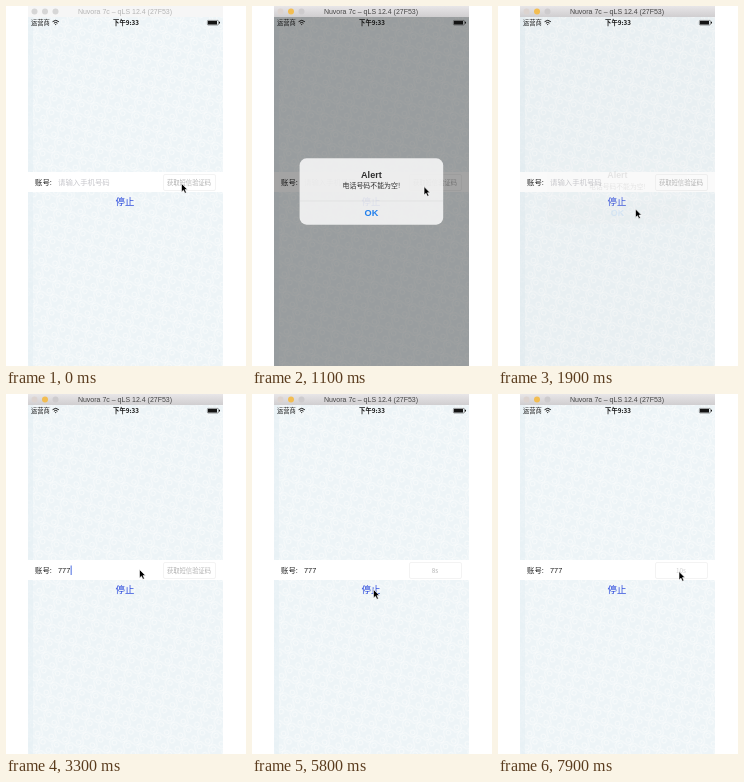
These frames come from a looping animation (240 px wide and 360 px high, 8 s). An HTML page:

```html
<!DOCTYPE html>
<html lang="zh-CN">
<head>
<meta charset="utf-8">
<title>验证码</title>
<style>
html, body { margin: 0; width: 100%; height: 100%; overflow: hidden; background: #fff; }
svg { display: block; width: 100vw; height: 100vh; }
text { font-family: "Noto Sans CJK SC", "Noto Sans CJK", "Noto Sans CJK JP", sans-serif; fill: #222; }
.latin { font-family: "Liberation Sans", Inter, sans-serif; }
.mid { text-anchor: middle; }
.status { font-size: 6.3px; fill: #141414; }
.field { font-size: 7.4px; }
.code { font-size: 6.3px; fill: #b2b2b2; }
</style>
</head>
<body>
<svg viewBox="0 0 240 360">
  <defs>
    <linearGradient id="bar" x2="0" y2="1">
      <stop stop-color="#e8e6e8"/><stop offset="1" stop-color="#d0ced0"/>
    </linearGradient>
    <pattern id="swirls" width="14" height="14" patternUnits="userSpaceOnUse" patternTransform="rotate(12)">
      <g fill="none" stroke="#fbfdfd" stroke-width=".8">
        <circle cx="3.5" cy="3.5" r="2.4"/>
        <circle cx="10.5" cy="10.5" r="2.4"/>
        <path d="M7 0Q10 3 7 7T7 14M0 7Q3 10 7 7T14 7"/>
      </g>
    </pattern>
    <clipPath id="phone"><rect x="22" y="11" width="195" height="349"/></clipPath>
  </defs>

  <rect x="22" width="195" height="11" fill="#f6f6f6"/>
  <rect id="activeBar" x="22" width="195" height="11" fill="url(#bar)"/>
  <circle class="light" cx="28.5" cy="5.5" r="3"/>
  <circle class="light" cx="39" cy="5.5" r="3"/>
  <circle class="light" cx="49.5" cy="5.5" r="3"/>
  <text id="title" class="latin mid" x="119" y="8.2" font-size="7">Nuvora 7c – qLS 12.4 (27F53)</text>

  <g clip-path="url(#phone)">
    <rect x="22" y="11" width="195" height="349" fill="#edf4f7"/>
    <rect x="22" y="11" width="195" height="349" fill="url(#swirls)"/>
    <rect x="22" y="11" width="5" height="349" fill="#e6f0f5" opacity=".6"/>

    <rect x="22" y="166" width="195" height="20" fill="#fff"/>
    <text class="field" x="29" y="179.1">账号:</text>
    <text id="hint" class="field" x="52" y="179.1" style="fill:#c6c6cb">请输入手机号码</text>
    <text id="entry" class="field latin" x="52" y="179"></text>
    <rect id="caret" y="171.5" width="1" height="9.5" fill="#4a6be0"/>
    <rect x="157.5" y="168.5" width="52" height="16" rx="1.5" fill="none" stroke="#f0f0f0" stroke-width=".8"/>
    <text id="code" class="code mid" x="183" y="178.8"></text>
    <text id="stop" class="mid" x="119" y="199.4" font-size="9.4" style="fill:#2746dc">停止</text>

    <rect id="dim" x="22" y="11" width="195" height="349"/>

    <text class="status" x="25" y="19.2">运营商</text>
    <g fill="none" stroke="#141414" stroke-width="1">
      <path d="M46.6 15.7Q49.7 12.9 52.8 15.7M47.9 17.2Q49.7 15.6 51.5 17.2"/>
      <path d="M49.2 18.6h1"/>
    </g>
    <text class="status mid" x="120" y="19.2" font-weight="700">下午9:33</text>
    <rect x="201.4" y="14.4" width="11" height="4.6" rx=".8" fill="none" stroke="#333" stroke-width=".5"/>
    <path d="M202 15h9v3.4h-9zM213 15.8h1v1.8h-1z" fill="#141414"/>

    <g id="alert">
      <rect x="-70.4" y="-32.5" width="140.8" height="65" rx="6.8" fill="#f8f8f8" fill-opacity=".97"/>
      <path id="press" d="M-70.4 9.3h140.8v16.4a6.8 6.8 0 0 1-6.8 6.8h-127.2a6.8 6.8 0 0 1-6.8-6.8z" fill="#e5e6e6"/>
      <path d="M-70.4 9.3h140.8" stroke="#d8d8da" stroke-width=".4"/>
      <text class="latin mid" y="-13.4" font-size="8.9" font-weight="700">Alert</text>
      <text class="mid" y="-3" font-size="6.8">电话号码不能为空!</text>
      <text class="latin mid" y="24.5" font-size="9" font-weight="700" style="fill:#147cf5">OK</text>
    </g>
  </g>

  <path id="cursor" d="M0 0V8.4L2 6.7L3.4 9.8L4.9 9.1L3.5 6.1H6Z" fill="#000" stroke="#fff" stroke-width=".6" stroke-linejoin="round"/>
</svg>
<script>
const LOOP = 8000;
const $ = id => document.getElementById(id);
const lights = document.querySelectorAll('.light');
const activeColors = ['#dcd3cf', '#f2bd52', '#cdcbcd'];

// Each row: time, then the values at that time.
const pointer = [
  [0, 175.5, 177.5], [1000, 175.5, 177.5], [1500, 143, 206.5], [1700, 143, 206.5],
  [1900, 137.5, 203], [2300, 133.5, 186], [2600, 133.5, 186], [2800, 133.5, 175.5],
  [3400, 133.5, 175.5], [3700, 181, 176], [4200, 181, 176], [4900, 138, 203],
  [5100, 136, 203], [5600, 121.5, 195.5], [6900, 121.5, 195.5], [7600, 181, 177.5], [8000, 181, 177.5]
];
// Dim, alert opacity, alert scale.
const fade = [
  [0, 0, 0, 1.2], [800, 0, 0, 1.2], [900, .2, .52, 1.1], [1000, .31, .8, 1.04],
  [1200, .4, 1, 1], [1700, .4, 1, 1], [1800, .17, .45, 1], [1900, .02, .1, 1], [2000, 0, 0, 1]
];
const smooth = u => u * u * (3 - 2 * u);
const linear = u => u;

function sample(rows, t, ease) {
  const i = rows.findIndex(row => row[0] > t);
  if (i < 0) return rows[rows.length - 1].slice(1);
  const a = rows[i - 1], b = rows[i];
  const u = ease((t - a[0]) / (b[0] - a[0]));
  return a.slice(1).map((v, k) => v + (b[k + 1] - v) * u);
}

const between = (t, from, to) => t >= from && t < to;

function codeLabel(t) {
  if (t < 3800) return '获取短信验证码';
  if (t >= 7800) return '10s';
  return Math.max(8, 10 - Math.floor((t - 3700) / 1000)) + 's';
}

function caretAlpha(t) {
  if (t < 2800) return 0;
  if (t < 3500) return 1;
  const phase = (t - 3300) % 1000;
  return Math.max(0, Math.min(1, (Math.abs(phase - 500) - 180) / 120));
}

function draw(t) {
  const active = t >= 800;
  $('activeBar').setAttribute('opacity', active ? 1 : 0);
  $('title').style.fill = active ? '#444' : '#b4b4b4';
  lights.forEach((light, i) => light.setAttribute('fill', active ? activeColors[i] : '#d6d6d6'));

  const [dim, alpha, scale] = sample(fade, t, linear);
  $('dim').setAttribute('opacity', dim);
  $('alert').setAttribute('opacity', alpha);
  $('alert').setAttribute('transform', `translate(119.4 185.5) scale(${scale})`);
  $('press').setAttribute('opacity', between(t, 1600, 2000) ? 1 : 0);

  const typed = [2900, 3000, 3100].filter(at => t >= at).length;
  $('hint').setAttribute('opacity', typed ? 0 : 1);
  $('entry').textContent = '7'.repeat(typed);
  $('caret').setAttribute('x', 52.3 + (typed ? $('entry').getComputedTextLength() : 0));
  $('caret').setAttribute('opacity', caretAlpha(t));
  $('code').textContent = codeLabel(t);
  $('code').setAttribute('opacity', t >= 7800 ? .6 : 1);
  $('stop').setAttribute('opacity', between(t, 6100, 6300) ? .3 : 1);

  const [x, y] = sample(pointer, t, smooth);
  $('cursor').setAttribute('transform', `translate(${x} ${y})`);
}

const start = performance.now();
function tick(now) {
  draw(Math.max(0, now - start) % LOOP);
  requestAnimationFrame(tick);
}
draw(0);
requestAnimationFrame(tick);
</script>
</body>
</html>
```
